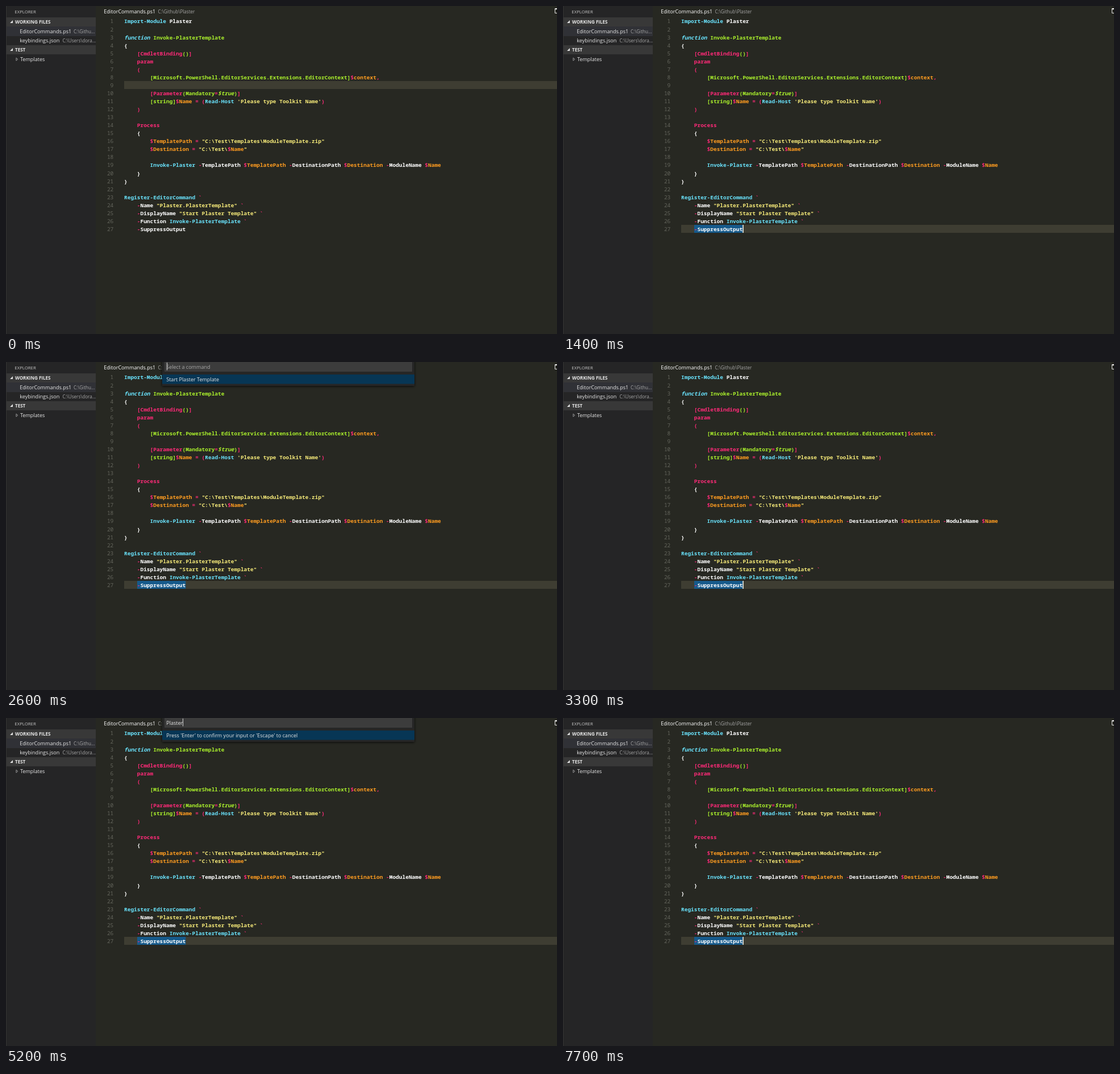
An HTML page that plays this animation: 970x577 px, repeating every 8 s.

```html
<!DOCTYPE html>
<html lang="en">
<head>
<meta charset="utf-8">
<title>Editor command</title>
<style>
  html, body { margin: 0; width: 100%; height: 100%; overflow: hidden; background: #272822; }
  svg { display: block; }
  text { white-space: pre; }
  .code { font: 600 9.49px "Noto Sans Mono", monospace; }
  .num { fill: #64655c; font-weight: 400; text-anchor: end; }
  .ui { font: 9.05px "Open Sans", sans-serif; fill: #e6e6e6; }
  .small { font-size: 8.1px; fill: #a6a6a6; }
  .head { font-size: 8.05px; font-weight: 700; }
  .white { fill: #fff; }
  .hint { fill: #a8a8a8; }
  .w { fill: #fff; }
  .p { fill: #ff2a78; }
  .c { fill: #69e2fc; }
  .g { fill: #aaf02c; }
  .y { fill: #f4e878; }
  .o { fill: #ff9c20; }
  .i { fill: #69e2fc; font-style: italic; }
  .t { fill: #aaf02c; font-style: italic; }
</style>
</head>
<body>
<svg width="970" height="577" viewBox="0 0 970 577">
  <defs>
    <filter id="shadow" x="-5%" y="-50%" width="110%" height="200%">
      <feDropShadow dx="0" dy="1" stdDeviation="2" flood-color="#000" flood-opacity=".8"/>
    </filter>
  </defs>
  <rect width="970" height="577" fill="#272822"/>

  <g id="sidebar">
    <rect width="158" height="577" fill="#252526"/>
    <rect width="1" height="577" fill="#333"/>
    <path d="M1 20h157v16H1zM1 69h157v16H1z" fill="#383838"/>
    <rect x="1" y="36" width="157" height="17" fill="#303136"/>
    <path d="M12 25v5H7zM12 74v5H7z" fill="#e0e0e0"/>
    <path d="M17.9 91.2v5l3-2.5z" fill="none" stroke="#b0b0b0" stroke-width=".8"/>
    <text class="ui" x="15.3" y="13.4" style="font-size:7.8px;fill:#c4c4c4">EXPLORER</text>
    <text class="ui head" x="16" y="31">WORKING FILES</text>
    <text class="ui" x="24.2" y="48">EditorCommands.ps1</text>
    <text class="ui small" x="119" y="48">C:\Githu...</text>
    <text class="ui" x="24.2" y="64.4">keybindings.json</text>
    <text class="ui small" x="99.6" y="64.4">C:\Users\dora...</text>
    <text class="ui head" x="16" y="80">TEST</text>
    <text class="ui" x="25" y="96.8">Templates</text>
  </g>

  <text class="ui white" x="172.2" y="13.2">EditorCommands.ps1</text>
  <text class="ui small" x="267.5" y="13.2">C:\Github\Plaster</text>
  <path d="M970 4.5h-3.5v8h3.5M970 5.5h-3" fill="none" stroke="#e8e8e8"/>

  <rect id="row" x="208" width="762" height="14" fill="#3e3d32"/>
  <rect id="selection" x="231" y="385" height="14" fill="#165a8b"/>
  <g id="code"></g>
  <rect id="caret" y="385" width="1.5" height="14" fill="#f8f8f0"/>

  <g id="palette">
    <rect x="275" y="-6" width="444" height="48" fill="#252526" filter="url(#shadow)"/>
    <rect x="279" y="-2" width="436" height="19" fill="#3c3c3c"/>
    <rect x="275" y="22" width="444" height="16.5" fill="#073655"/>
    <text id="field" class="ui" x="282.2" y="11.8"></text>
    <text id="item" class="ui" x="282.2" y="33.8"></text>
    <rect id="bar" y="1" width="1" height="13.5" fill="#d8d8d8"/>
  </g>
</svg>
<script>
const LOOP = 8000, LEFT = 208, CHAR = 5.694, ROW = 14.056;
const $ = id => document.getElementById(id);
const rowTop = n => 132 + (n - 9) * ROW;

// Tokens are split by "|"; the first letter of each is its colour class.
const lines = [
  'cImport-Module|w Plaster',
  '',
  'ifunction|g Invoke-PlasterTemplate',
  'w{',
  'p    [CmdletBinding|g()|p]',
  'p    param',
  'p    (',
  'g        [Microsoft.PowerShell.EditorServices.Extensions.EditorContext]|p$|ocontext|p,',
  '',
  'p        [Parameter|g(Mandatory|p=|t$true|g)|p]',
  "g        [string]|p$|oName|p = (|cRead-Host|y 'Please type Toolkit Name'|p)",
  'p    )',
  '',
  'p    Process',
  'w    {',
  'p        $|oTemplatePath|p = |y"C:\\Test\\Templates\\ModuleTemplate.zip"',
  'p        $|oDestination|p = |y"C:\\Test\\|p$|oName|y"',
  '',
  'c        Invoke-Plaster|p -|wTemplatePath|p $|oTemplatePath|p -|wDestinationPath|p $|oDestination|p -|wModuleName|p $|oName',
  'w    }',
  'w}',
  '',
  'cRegister-EditorCommand|p `',
  'p    -|wName|y "Plaster.PlasterTemplate"|p `',
  'p    -|wDisplayName|y "Start Plaster Template"|p `',
  'p    -|wFunction|c Invoke-PlasterTemplate|p `',
  'p    -|wSuppressOutput'
];

function codeLine(line, i) {
  const y = Math.round(rowTop(i + 1) + 10.9);
  const indent = line.slice(1).search(/\S|$/);
  const spans = line.split('|').filter(Boolean).map((tok, k) =>
    `<tspan class="${tok[0]}">${k ? tok.slice(1) : tok.slice(1 + indent)}</tspan>`);
  return `<text class="code num" x="189.3" y="${y}">${i + 1}</text>` +
    `<text class="code" x="${LEFT + indent * CHAR}" y="${y}">${spans.join('')}</text>`;
}
$('code').innerHTML = lines.map(codeLine).join('');

// Each table holds [start time, value] steps.
const current = [[0, 9], [600, 27]];
const selected = [[0, 0], [800, 8], [900, 15]];
const caretOn = [[0, 0], [600, 1], [1000, 0], [1400, 1], [1900, 0], [2300, 1],
  [2600, 0], [3300, 1], [3400, 0], [7700, 1]];
const panel = [[0, ''], [2600, 'pick'], [3300, ''], [3400, 'ask'], [7700, '']];
const barOn = [[0, 1], [3100, 0], [3400, 1], [3800, 0], [4300, 1], [6300, 0], [6700, 1]];
const typed = [[0, 0], [4400, 1], [4500, 2], [4600, 3], [4700, 4], [4900, 5], [5000, 6],
  [5200, 7], [5600, 9], [5800, 11], [6700, 12], [6800, 13], [6900, 14], [7000, 15],
  [7200, 16], [7300, 17]];

const panels = {
  pick: { hint: 'Select a command', item: 'Start Plaster Template' },
  ask: { hint: 'Name:', item: "Press 'Enter' to confirm your input or 'Escape' to cancel" }
};

const at = (steps, t) => steps.findLast(s => s[0] <= t)[1];
const show = (el, on) => el.setAttribute('visibility', on ? 'visible' : 'hidden');

function drawPanel(t) {
  const mode = panels[at(panel, t)];
  $('palette').style.display = mode ? '' : 'none';
  if (!mode) return;
  const field = $('field');
  const text = 'PlasterTestModule'.slice(0, at(typed, t));
  field.textContent = text || mode.hint;
  field.classList.toggle('hint', !text);
  $('item').textContent = mode.item;
  $('bar').setAttribute('x', text ? Math.floor(282.2 + field.getComputedTextLength()) : 283);
  show($('bar'), at(barOn, t));
}

function draw(t) {
  const count = at(selected, t);
  $('row').setAttribute('y', Math.round(rowTop(at(current, t))));
  $('selection').setAttribute('width', count * CHAR);
  $('caret').setAttribute('x', LEFT + (4 + count) * CHAR + 0.1);
  show($('caret'), at(caretOn, t));
  drawPanel(t);
}

const start = performance.now();
function frame() {
  draw((performance.now() - start) % LOOP);
  requestAnimationFrame(frame);
}
draw(0);
requestAnimationFrame(frame);
</script>
</body>
</html>
```
